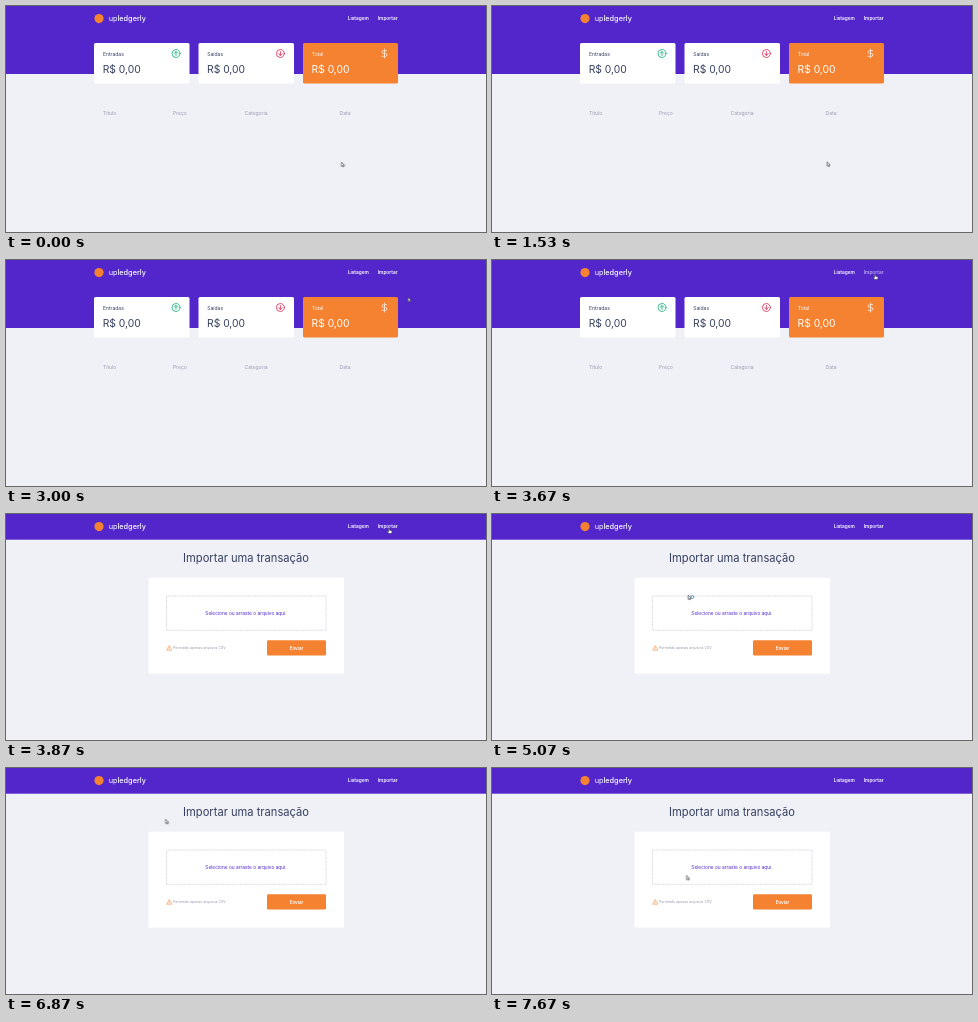
Write an HTML page that moves like this. It is 480x226 px and loops after 8000 ms.

```html
<!DOCTYPE html>
<html lang="pt-BR">
<head>
<meta charset="utf-8">
<title>Transações</title>
<style>
  :root { --purple: #5326cc; --orange: #f48230; --ink: #363f5f; --muted: #969cb3; }
  html, body { margin: 0; width: 100%; height: 100%; overflow: hidden; background: #f0f1f6; }
  svg { display: block; width: 100%; height: 100%; font: 5px Inter, "Open Sans", sans-serif; fill: var(--ink); }
  .purple { fill: var(--purple); }
  .orange { fill: var(--orange); }
  .white { fill: #fff; }
  .muted { fill: var(--muted); }
  .value { font-size: 10.3px; }
  .nav { font-size: 4.75px; font-weight: 600; }
  .brand { font-size: 7.3px; }
  .heading { font-size: 11.15px; text-anchor: middle; }
  .middle { text-anchor: middle; }
  .line { fill: none; stroke-width: 2.2; stroke-linecap: round; stroke-linejoin: round; }
  .shape { fill: #fff; stroke: #34343f; stroke-width: .6; stroke-linejoin: round; }

  .list, .import, .arrow, .hand, .busy { animation: 8s step-end infinite; }
  .list { animation-name: list; }
  .import { animation-name: import; }
  .arrow { animation-name: arrow; }
  .hand { animation-name: hand; }
  .busy { animation-name: busy; }
  .link { animation: hover 8s linear infinite; }
  .cursor { animation: travel 8s linear infinite; }

  @keyframes list { 0% { visibility: visible } 48.33%, 100% { visibility: hidden } }
  @keyframes import { 0% { visibility: hidden } 48.33%, 100% { visibility: visible } }
  @keyframes hover { 0%, 42% { opacity: 1 } 44.5%, 48.32% { opacity: .6 } 48.33%, 100% { opacity: 1 } }
  @keyframes arrow {
    0%, 49.5%, 59.1%, 100% { visibility: visible }
    42%, 55.3% { visibility: hidden }
  }
  @keyframes hand {
    0%, 49.5%, 59.1%, 100% { visibility: hidden }
    42%, 55.3% { visibility: visible }
  }
  @keyframes busy {
    0%, 65%, 100% { visibility: hidden }
    59.1% { visibility: visible }
  }
  @keyframes travel {
    0%, 19.1% { transform: translate(335.3px, 156px) }
    24% { transform: translate(275px, 112px) }
    27% { transform: translate(296px, 80px) }
    29.2%, 30% { transform: translate(320.6px, 86.2px) }
    32% { transform: translate(330px, 92px) }
    37% { transform: translate(400px, 42px) }
    39% { transform: translate(407px, 23px) }
    40%, 40.9% { transform: translate(394px, 18px) }
    43% { transform: translate(388px, 13px) }
    45.8%, 48.4% { transform: translate(383px, 14px) }
    52% { transform: translate(320px, 60px) }
    56.6%, 62.5% { transform: translate(221px, 92.5px) }
    63.3% { transform: translate(196.3px, 81.3px) }
    72.5%, 73.3% { transform: translate(148.5px, 48px) }
    75% { transform: translate(144.3px, 37.5px) }
    79.1%, 80.9% { transform: translate(139px, 25.5px) }
    82.5% { transform: translate(137px, 17px) }
    90.9%, 91.6% { transform: translate(192.5px, 101.5px) }
    95.8%, 100% { transform: translate(194.3px, 107.3px) }
  }
</style>
</head>
<body>
<svg viewBox="0 0 480 226" preserveAspectRatio="none">
  <g class="list">
    <rect class="purple" width="480" height="68"/>

    <rect class="white" x="88" y="37" width="95.5" height="40.5" rx="1.5"/>
    <text x="97" y="49.5">Entradas</text>
    <text class="value" x="96.7" y="67.3">R$ 0,00</text>
    <g class="line" stroke="#25b581" transform="translate(165.2 42.7) scale(.4)">
      <circle cx="12" cy="12" r="10"/>
      <path d="M12 17V7M7.5 11.5L12 7l4.5 4.5"/>
    </g>

    <rect class="white" x="192.5" y="37" width="95.5" height="40.5" rx="1.5"/>
    <text x="201.3" y="49.5">Saídas</text>
    <text class="value" x="201" y="67.3">R$ 0,00</text>
    <g class="line" stroke="#e0395f" transform="translate(269.6 42.7) scale(.4)">
      <circle cx="12" cy="12" r="10"/>
      <path d="M12 7v10M7.5 12.5L12 17l4.5-4.5"/>
    </g>

    <rect class="orange" x="297" y="37" width="95" height="40.5" rx="1.5"/>
    <text class="white" x="305.8" y="49.5">Total</text>
    <text class="value white" x="305.5" y="67.3">R$ 0,00</text>
    <path class="line" stroke="#ffe9d8" transform="translate(373.7 42.7) scale(.4)"
      d="M12 1v22M17 5H9.5a3.5 3.5 0 0 0 0 7h5a3.5 3.5 0 0 1 0 7H6"/>

    <g class="muted">
      <text x="97" y="108.9">Título</text>
      <text x="167" y="108.9">Preço</text>
      <text x="238.6" y="108.9">Categoria</text>
      <text x="333.6" y="108.9">Data</text>
    </g>
  </g>

  <g class="import">
    <rect class="purple" width="480" height="25.7"/>
    <text class="heading" x="240" y="48.3">Importar uma transação</text>
    <rect class="white" x="142.5" y="63.7" width="195.5" height="96" rx="1.5"/>
    <rect x="160.5" y="82" width="159.5" height="34.3" fill="none" stroke="#a9adbf" stroke-width=".5" stroke-dasharray="1 .7"/>
    <text class="purple middle" x="240" y="100.6" font-size="4.8">Selecione ou arraste o arquivo aqui.</text>
    <g class="line" stroke="#f48230" transform="translate(160.2 131.2) scale(.24)">
      <path d="M12 3L2 21h20zM12 10v4M12 17.5v.1"/>
    </g>
    <text class="muted" x="167" y="135.3" font-size="3.55">Permitido apenas arquivos CSV</text>
    <rect class="orange" x="261" y="126.3" width="59" height="15.3" rx="1.4"/>
    <text class="white middle" x="290.5" y="135.7" font-size="4.5" font-weight="600">Enviar</text>
  </g>

  <circle class="orange" cx="93" cy="12.6" r="4.6"/>
  <text class="brand white" x="102.7" y="14.8">up<tspan font-weight="500">ledgerly</tspan></text>
  <text class="nav white" x="341.8" y="14.4">Listagem</text>
  <text class="nav white link" x="371.8" y="14.4">Importar</text>

  <g class="cursor">
    <path class="arrow shape" d="M.2.2v4.2l1-.9.7 1.5.8-.4-.7-1.4h1.3z"/>
    <path class="hand shape" d="M-.5.5q.5-.6 1 0v1.7l2.1.5q.5.2.4.8L2.6 5.5H-.2L-1.7 3.6q.2-.7 1.2 0z"/>
    <circle class="busy" cx="4.4" cy="2" r="1.5" fill="none" stroke="#3b8ca3" stroke-width=".9"/>
  </g>
</svg>
</body>
</html>
```
